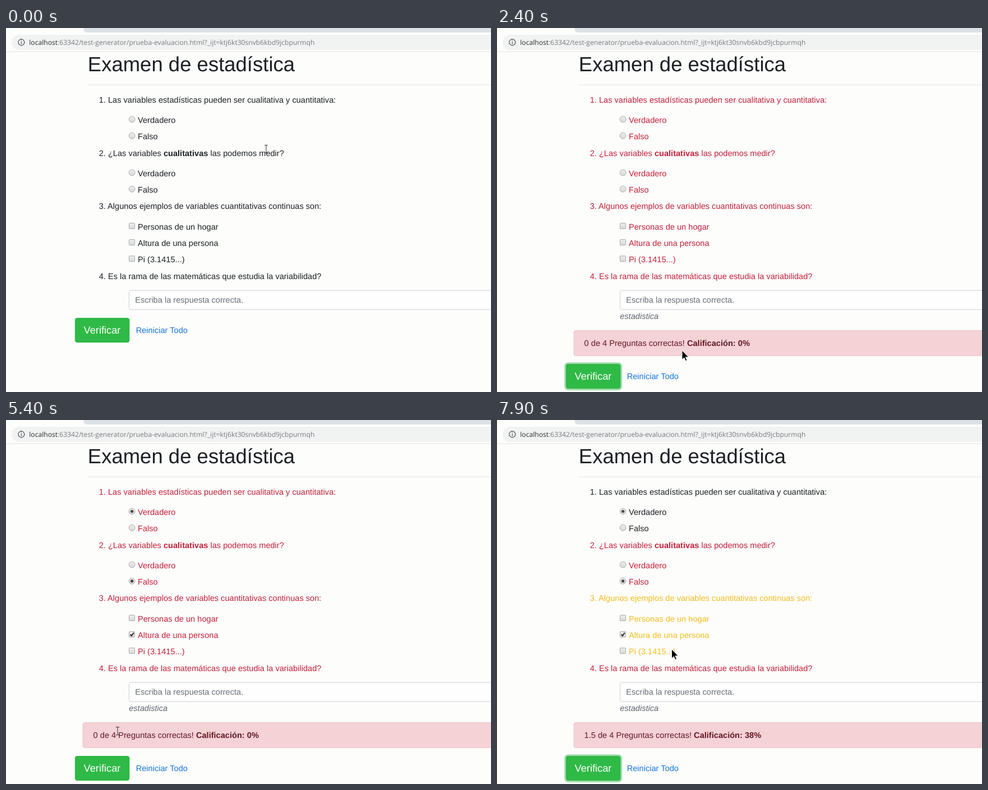
Write an HTML page that moves like this. It is 865x648 px and loops after 8 s.

```html
<!DOCTYPE html>
<html lang="es">
<head>
<meta charset="utf-8">
<title>Examen de estadística</title>
<style>
  html, body { margin: 0; width: 100%; height: 100%; overflow: hidden; background: #fdfdfc; }
  svg { display: block; width: 865px; height: 648px; }
  text { font: 14.6px "Liberation Sans", Arial, sans-serif; white-space: pre; text-rendering: geometricPrecision; }
  .title { font-size: 36.5px; fill: #1c2024; }
  .url { font: 12.12px "Open Sans", "Noto Sans", sans-serif; fill: #777b7f; }
  .hint { font-style: italic; fill: #5d646b; }
  .action { font-size: 18.25px; fill: #fff; }
  .muted { fill: #687077; }
  .bold { font-weight: bold; }
</style>
</head>
<body>
<svg id="stage" viewBox="0 0 865 648">
  <defs>
    <linearGradient id="control" x2="0" y2="1">
      <stop stop-color="#eeeeee"/><stop offset="1" stop-color="#d9d9d9"/>
    </linearGradient>
  </defs>
  <rect width="865" height="648" fill="#fdfdfc"/>

  <path d="M138 0H865V8H146Q138 8 138 0Z" fill="#dce2e4"/>
  <rect x="10" y="12" width="880" height="27" rx="13.5" fill="#f1f2f2"/>
  <path d="M0 42H865" stroke="#dfe0e2"/>
  <circle cx="27.3" cy="25.5" r="5.5" fill="none" stroke="#55595d" stroke-width="1.3"/>
  <path d="M27.3 24.8V28.5M27.3 22.4V23.7" stroke="#55595d" stroke-width="1.3"/>
  <text class="url" x="41.3" y="30"><tspan fill="#2a2d30">localhost</tspan>:63342/test-generator/prueba-evaluacion.html?_ijt=ktj6kt30snvb6kbd9jcbpurmqh</text>

  <text class="title" x="145.8" y="77">Examen de estadística</text>
  <path d="M146 101.2H865" stroke="#e3e4e9"/>
  <g id="questions"></g>

  <rect x="219.5" y="467.2" width="680" height="34" rx="3.6" fill="#fefefe" stroke="#cdd1d3"/>
  <text class="muted" x="230.2" y="489.2">Escriba la respuesta correcta.</text>

  <g id="result">
    <text class="hint" x="219.2" y="517.6">estadistica</text>
    <rect x="137" y="538.6" width="780" height="44.8" rx="3.6" fill="#f4d2d6" stroke="#efc5ca"/>
    <text x="155.6" y="566" fill="#651722"><tspan id="score"></tspan> de 4 Preguntas correctas! <tspan class="bold">Calificación: <tspan id="grade"></tspan>%</tspan></text>
  </g>

  <g id="actions">
    <rect id="ring" x="120.2" y="513.2" width="102.9" height="49.6" rx="6.5" fill="#a3dcae"/>
    <rect id="button" x="122.9" y="515.9" width="97.5" height="44" rx="4.2"/>
    <text class="action" x="138.5" y="544.4">Verificar</text>
    <text x="231.7" y="543.1" fill="#1775dc">Reiniciar Todo</text>
  </g>

  <g id="cursor">
    <path id="arrow" d="M0 0V16.4L3.8 12.9L6.4 18.6L8.9 17.4L6.4 11.9H11.6Z" fill="#000" stroke="#fff" stroke-width=".9"/>
    <g id="hand">
      <path d="M-1.5 1.4Q0-1 1.5 1.4V6.2Q3 4.6 4.2 6.8Q5.8 5.4 6.6 7.5Q8.6 6.6 9 9V12.5Q8.6 14.6 7.4 16V18.2H.2V16.5L-3.9 11.6Q-5 9.4-3.4 9Q-2.4 9-1.5 10.4Z" fill="#fff" stroke="#111" stroke-width="1.1" stroke-linejoin="round"/>
      <path d="M1.7 6V9.5M4.2 7V9.8M6.6 7.8V10" stroke="#111" stroke-width=".9"/>
    </g>
    <path id="beam" d="M-3-7H-1L0-6L1-7H3M0-6V6M-3 7H-1L0 6L1 7H3" fill="none" stroke="#444" stroke-width="1.1"/>
  </g>
</svg>
<script>
const $ = id => document.getElementById(id);
const DURATION = 8000, STEP = 100;
const FIRST_CHECK = 1400, SECOND_CHECK = 5800;
const INK = "#1c2024", RED = "#c0203a", YELLOW = "#f4bd20";

const questions = [
  { y: 127.5, end: 589, text: "1. Las variables estadísticas pueden ser cualitativa y cuantitativa:",
    options: ["Verdadero", "Falso"], pick: 0, at: 3200, final: INK },
  { y: 222.4, end: 496, text: "2. ¿Las variables <tspan class='bold'>cualitativas</tspan> las podemos medir?",
    options: ["Verdadero", "Falso"], pick: 1, at: 4200, final: RED },
  { y: 317.3, end: 564, text: "3. Algunos ejemplos de variables cuantitativas continuas son:",
    options: ["Personas de un hogar", "Altura de una persona", "Pi (3.1415...)"],
    pick: 1, at: 4800, box: true, final: YELLOW },
  { y: 441.4, end: 563, text: "4. Es la rama de las matemáticas que estudia la variabilidad?",
    options: [], final: RED }
];

// Pointer stops: time, x, y
const stops = [
  [0, 464, 215.5], [200, 464, 215.5], [1050, 179, 529], [1500, 179, 529],
  [2100, 330, 574], [2500, 330, 574], [3100, 245, 168], [3400, 245, 168],
  [3900, 248, 290], [4300, 248, 290], [4700, 252, 384], [5000, 252, 384],
  [5600, 180.5, 613], [6200, 180.5, 613], [7000, 311.5, 408], [8000, 311.5, 408]
];

const line = (x, center, text) => `<text x="${x}" y="${center + 5.1}">${text}</text>`;

function control(y, box) {
  const style = 'fill="url(#control)" stroke="#a9a9a9"';
  return box
    ? `<rect x="219.5" y="${y - 5}" width="10" height="10" rx="1.2" ${style}/>`
    : `<circle cx="224.6" cy="${y}" r="5.4" ${style}/>`;
}

function mark(y, box) {
  return box
    ? `<path class="mark" d="M221.6 ${y}l2.2 2.6l4-5.4" fill="none" stroke="#222" stroke-width="1.9"/>`
    : `<circle class="mark" cx="224.6" cy="${y}" r="2.7" fill="#4c4c4c"/>`;
}

$("questions").innerHTML = questions.map(q => {
  const rows = q.options.map((label, i) => {
    const y = q.y + 36.4 + i * 29.2;
    return control(y - 1.3, q.box) + (i === q.pick ? mark(y - 1.3, q.box) : "") + line(235, y, label);
  });
  return `<g>${line(165.7, q.y, q.text)}${rows.join("")}</g>`;
}).join("");
const groups = [...$("questions").children];

function pointerAt(t) {
  const i = stops.findIndex(s => s[0] > t);
  const [t0, x0, y0] = stops[i - 1], [t1, x1, y1] = stops[i];
  const p = (t - t0) / (t1 - t0), k = p * p * (3 - 2 * p);
  return [x0 + (x1 - x0) * k, y0 + (y1 - y0) * k];
}

const show = (el, on) => el.setAttribute("visibility", on ? "visible" : "hidden");

function render(t) {
  const checked = t >= FIRST_CHECK, rechecked = t >= SECOND_CHECK;
  const shift = checked ? 82.1 : 0;

  questions.forEach((q, i) => {
    groups[i].setAttribute("fill", rechecked ? q.final : checked ? RED : INK);
    const el = groups[i].querySelector(".mark");
    if (el) show(el, t >= q.at);
  });

  show($("result"), checked);
  $("score").textContent = rechecked ? "1.5" : "0";
  $("grade").textContent = rechecked ? "38" : "0";

  const [x, y] = pointerAt(t);
  const overButton = x > 123 && x < 220 && y > 516 + shift && y < 560 + shift;
  const overText = questions.some(q => Math.abs(y - q.y) < 10.9 && x > 182 && x < q.end)
    || checked && Math.abs(y - 561) < 10.9 && x > 156 && x < (rechecked ? 471 : 451);

  $("actions").setAttribute("transform", `translate(0 ${shift})`);
  show($("ring"), checked && t < questions[0].at || rechecked);
  $("button").setAttribute("fill", overButton && t > 1100 ? "#27933a" : "#2fb946");

  $("cursor").setAttribute("transform", `translate(${x} ${y})`);
  show($("hand"), overButton);
  show($("beam"), !overButton && overText);
  show($("arrow"), !overButton && !overText);
}

const start = performance.now();
function tick() {
  const t = (performance.now() - start) % DURATION;
  render(Math.floor(t / STEP) * STEP);
  requestAnimationFrame(tick);
}
tick();
</script>
</body>
</html>
```
